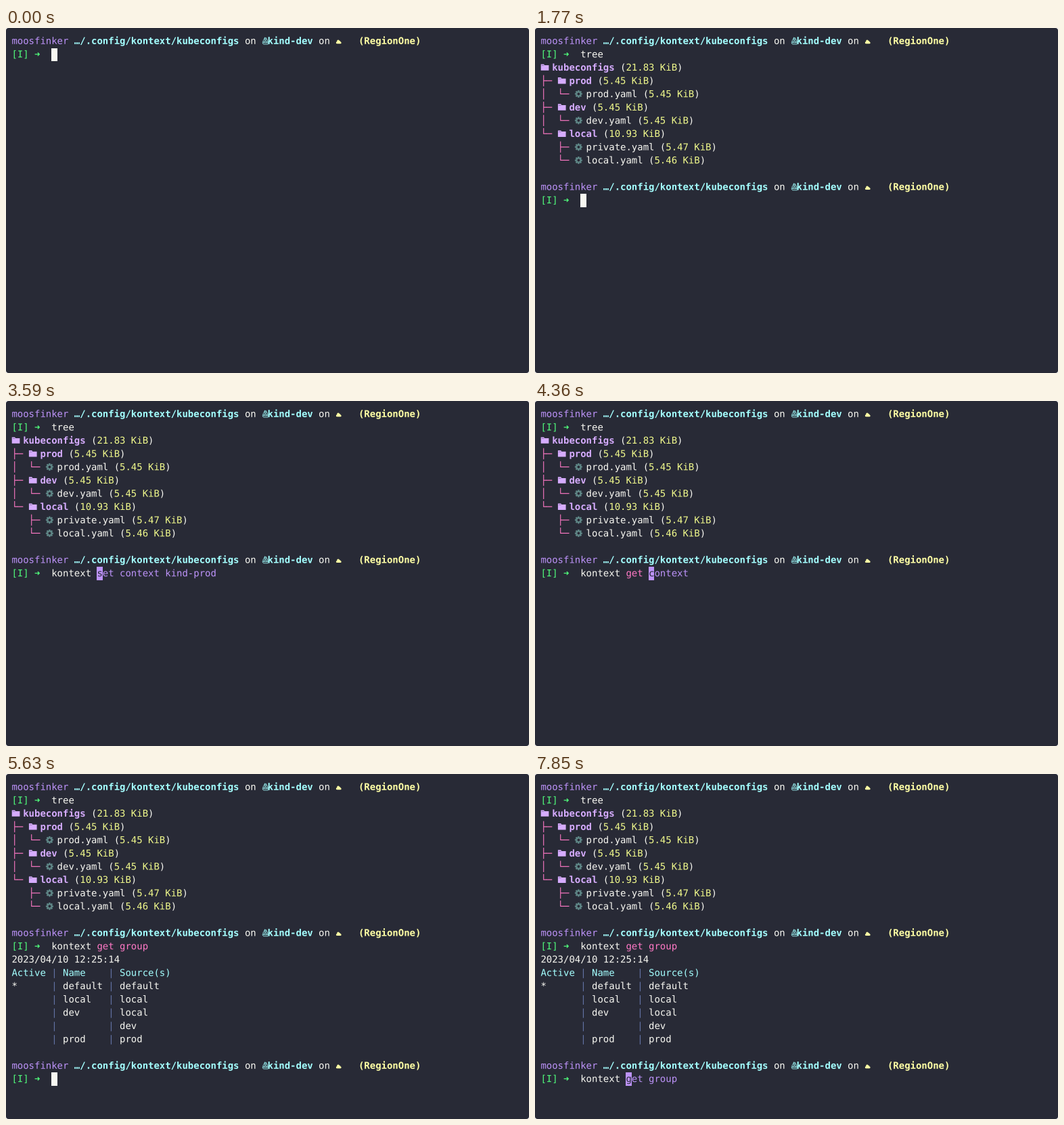
Recreate the animation shown at these times as an HTML page with a canvas. Size 773 by 510 pixels, loop 8000 ms.

```html
<!DOCTYPE html>
<html lang="en">
<head>
<meta charset="utf-8">
<title>Terminal session</title>
<style>
html, body { margin: 0; width: 100%; height: 100%; overflow: hidden; background: #fff; }
canvas { display: block; }
</style>
</head>
<body>
<canvas id="stage" width="773" height="510"></canvas>
<script>
const W = 773, H = 510, LOOP = 8000;
const CELL = W / 92, LINE = H / 26, SIZE = 14;
const C = {
  bg: '#282a36', fg: '#f8f8f2', red: '#ff5555', green: '#50fa7b', yellow: '#f1fa8c',
  purple: '#bd93f9', pink: '#ff79c6', gray: '#6272a4', lightYellow: '#ffffa5',
  lightPurple: '#d6acff', lightCyan: '#a4ffff', teal: '#5f8787'
};
const ctx = document.getElementById('stage').getContext('2d');
ctx.textRendering = 'geometricPrecision';

const colX = col => (col + 1) * CELL;
const rowY = row => (row + 0.5) * LINE;

function poly(...points) {
  ctx.beginPath();
  points.forEach(([x, y]) => ctx.lineTo(x, y));
  ctx.closePath();
}

// Icons are drawn relative to the top left corner of their cell.
const icons = {
  '⛵': () => {
    ctx.lineWidth = 0.8;
    poly([4.6, 4], [4.6, 10.6], [1.4, 10.6]);
    ctx.stroke();
    poly([6, 4.4], [9.4, 10.6], [6, 10.6]);
    ctx.stroke();
    poly([0.9, 12], [10.6, 12], [9.2, 14.2], [2.4, 14.2]);
    ctx.stroke();
  },
  '☁': () => {
    ctx.beginPath();
    for (const [x, y, r] of [[2.1, 11.9, 1.6], [3.7, 9.7, 1.9], [5.7, 10.9, 1.6], [6.9, 12.1, 1.4]]) {
      ctx.moveTo(x + r, y);
      ctx.arc(x, y, r, 0, Math.PI * 2);
    }
    ctx.rect(2.1, 11, 4.8, 2.5);
    ctx.fill();
  },
  '▣': () => {
    poly([0.3, 4.4], [4.6, 4.4], [5.8, 6], [12, 6], [12, 13.8], [0.3, 13.8]);
    ctx.fill();
    ctx.fillStyle = C.bg;
    ctx.globalAlpha = 0.55;
    ctx.fillRect(1.3, 6.1, 3.6, 0.7);
    ctx.globalAlpha = 1;
  },
  '⚙': () => {
    const cx = 5.6, cy = 9.2;
    ctx.lineWidth = 2.3;
    ctx.beginPath();
    ctx.arc(cx, cy, 3.1, 0, Math.PI * 2);
    ctx.stroke();
    ctx.beginPath();
    for (let i = 0; i < 8; i++) {
      const a = i * Math.PI / 4, dx = Math.cos(a), dy = Math.sin(a);
      ctx.moveTo(cx + dx * 3.6, cy + dy * 3.6);
      ctx.lineTo(cx + dx * 5.5, cy + dy * 5.5);
    }
    ctx.stroke();
  }
};

function glyph(ch, col, row, color, bold) {
  if (ch === ' ') return;
  ctx.save();
  ctx.fillStyle = ctx.strokeStyle = color;
  if (icons[ch]) {
    ctx.translate(colX(col), rowY(row));
    icons[ch]();
  } else {
    // The tiny skew keeps the baseline from snapping to whole pixels.
    ctx.transform(1, 0.0005, 0, 1, colX(col), rowY(row) + SIZE);
    ctx.font = `${bold ? 'bold ' : ''}${SIZE}px "DejaVu Sans Mono", monospace`;
    ctx.fillText(ch, 0, 0);
  }
  ctx.restore();
}

// Each span is [text, colour, bold].
function write(row, ...spans) {
  let col = 0;
  for (const [text, color = C.fg, bold] of spans)
    for (const ch of text) glyph(ch, col++, row, color, bold);
}

function cursor(col, row, color) {
  const x = Math.round(colX(col)), y = Math.round(rowY(row) + 0.1);
  ctx.fillStyle = color;
  ctx.fillRect(x, y, Math.round(colX(col + 1)) - x, Math.round(rowY(row + 1) + 0.1) - y);
}

function prompt(row) {
  write(row, ['moosfinker ', C.purple], ['…/.config/kontext/kubeconfigs', C.lightCyan, true],
    [' on '], ['⛵kind-dev', C.lightCyan, true], [' on '], ['☁   (RegionOne)', C.lightYellow, true]);
  write(row + 1, ['[I] ➜', C.green]);
}

function treeLine(row, branch, name, size) {
  const file = name.endsWith('.yaml');
  write(row, [branch, C.pink], [file ? '⚙ ' : '▣ ', file ? C.teal : C.lightPurple],
    [name, file ? C.fg : C.lightPurple, !file], [' ('], [size + ' KiB', C.yellow], [')']);
}

function tree() {
  [
    ['', 'kubeconfigs', '21.83'],
    ['├─ ', 'prod', '5.45'],
    ['│  └─ ', 'prod.yaml', '5.45'],
    ['├─ ', 'dev', '5.45'],
    ['│  └─ ', 'dev.yaml', '5.45'],
    ['└─ ', 'local', '10.93'],
    ['   ├─ ', 'private.yaml', '5.47'],
    ['   └─ ', 'local.yaml', '5.46']
  ].forEach((line, i) => treeLine(2 + i, ...line));
}

function groups() {
  write(13, ['2023/04/10 12:25:14']);
  [
    ['Active', 'Name', 'Source(s)'],
    ['*', 'default', 'default'],
    ['', 'local', 'local'],
    ['', 'dev', 'local'],
    ['', '', 'dev'],
    ['', 'prod', 'prod']
  ].forEach(([active, name, source], i) => {
    const color = i ? C.fg : C.lightCyan;
    write(14 + i, [active.padEnd(7), color], ['| ', C.gray], [name.padEnd(8), color],
      ['| ', C.gray], [source, color]);
  });
}

const commands = ['k', 'tr', 'tree', 'kontext'];

// Known commands are plain, unknown ones red, arguments pink.
function commandLine(row, typed, hint, active) {
  const [word] = typed.split(' ');
  const col = 7 + typed.length, under = active && hint[typed.length];
  write(row, [' '.repeat(7)], [word, commands.includes(word) ? C.fg : C.red],
    [typed.slice(word.length), C.pink], [hint.slice(typed.length), C.purple]);
  if (active) cursor(col, row, under ? C.purple : C.fg);
  if (under) glyph(under, col, row, C.bg);
}

const SET = 'kontext set context kind-prod', GET = 'kontext get context', GROUP = 'kontext get group';

// Each key is [time, characters typed, full suggestion].
const sessions = [
  { row: 1, start: 0, end: 1770, keys: [
    [660, 1, 'tree'], [750, 2, 'tree'], [1200, 3, 'tree'], [1430, 4, 'tree']] },
  { row: 12, start: 1770, end: 5630, keys: [
    [2690, 1, 'kx set group'], [2870, 2, SET], [2940, 3, SET], [3010, 4, SET], [3080, 5, SET],
    [3300, 6, SET], [3490, 7, SET], [3590, 8, SET], [3820, 10, GET], [4120, 11, GET],
    [4360, 12, GET], [4860, 13, GROUP], [4930, 14, GROUP], [5000, 15, GROUP],
    [5220, 16, GROUP], [5420, 17, GROUP]] },
  { row: 22, start: 5630, end: LOOP, keys: [
    [6950, 1, GROUP], [7120, 2, GROUP], [7190, 3, GROUP], [7260, 4, GROUP], [7330, 5, GROUP],
    [7540, 6, GROUP], [7720, 7, GROUP], [7850, 8, GROUP]] }
];

function draw(t) {
  ctx.clearRect(0, 0, W, H);
  ctx.fillStyle = C.bg;
  ctx.beginPath();
  ctx.roundRect(0, 0, W, H, 4);
  ctx.fill();

  for (const { row, start, end, keys } of sessions) {
    if (t < start) break;
    prompt(row - 1);
    const [, count, hint] = keys.filter(([time]) => time <= t).pop() || [0, 0, ''];
    commandLine(row, hint.slice(0, count), hint, t < end);
  }
  if (t >= sessions[1].start) tree();
  if (t >= sessions[2].start) groups();
}

const begin = performance.now();
function frame() {
  draw((performance.now() - begin) % LOOP);
  requestAnimationFrame(frame);
}
frame();
</script>
</body>
</html>
```
